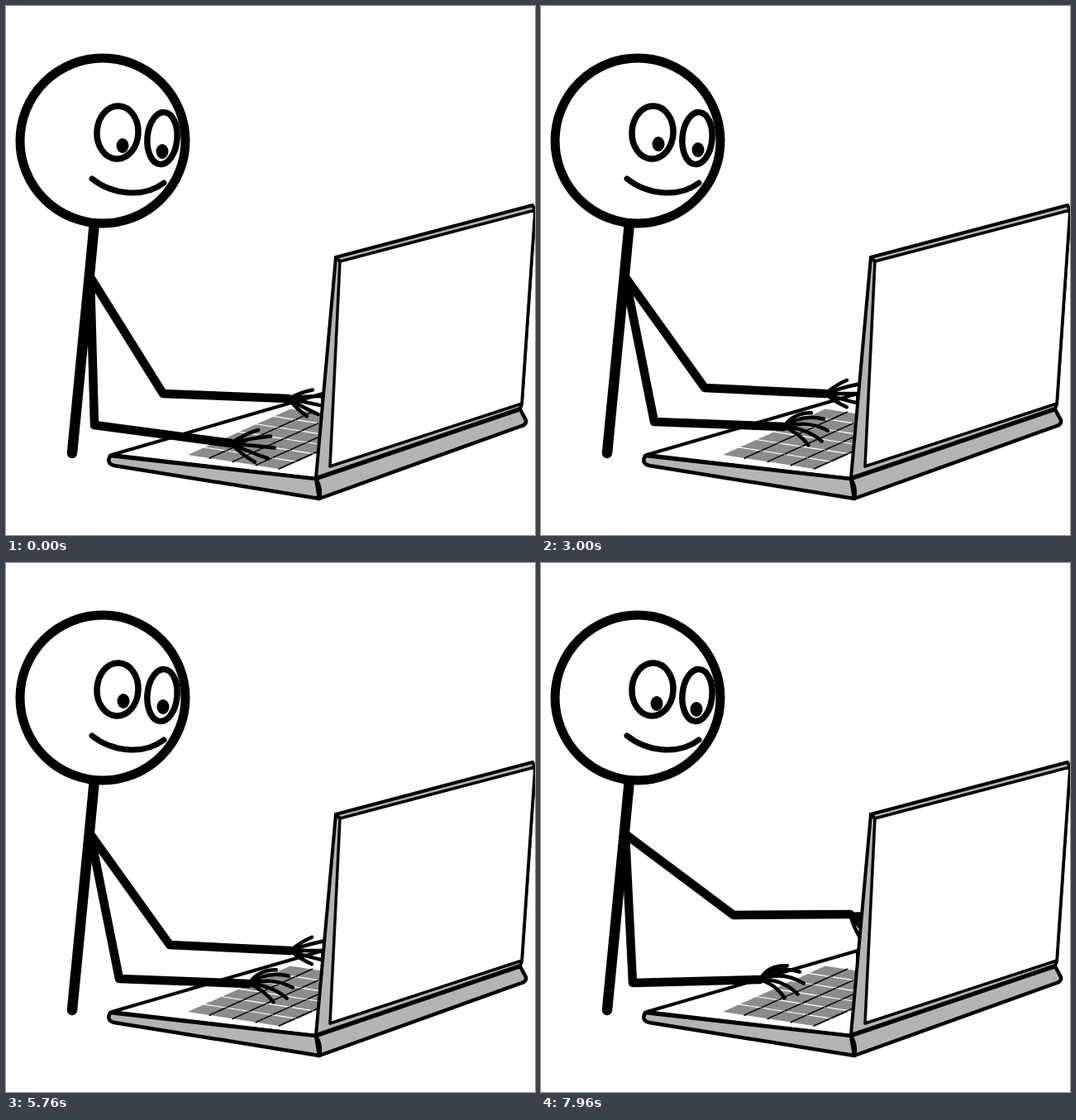
An HTML page that plays this animation: 640 px wide and 640 px high, repeating every 8 s.

```html
<!DOCTYPE html>
<html lang="en">
<head>
<meta charset="utf-8">
<title>Typing</title>
<style>
html, body { margin: 0; width: 100%; height: 100%; overflow: hidden; background: #fff; }
svg { display: block; width: 100%; height: 100%; }
</style>
</head>
<body>
<svg viewBox="0 0 640 640" fill="none" stroke="#000" stroke-linecap="round" stroke-linejoin="round">
  <g id="figure">
    <circle cx="117" cy="163" r="100" stroke-width="11"/>
    <ellipse cx="135" cy="153" rx="25" ry="32" stroke-width="7.5" transform="rotate(3 135 153)"/>
    <ellipse cx="189" cy="160" rx="18" ry="31.5" stroke-width="7.5" transform="rotate(5 189 160)"/>
    <path d="M104 209C128 228 166 233 191 214" stroke-width="7"/>
    <path d="M106.500 267L101 325L80 541" stroke-width="12.5"/>
    <g id="pupils" fill="#000" stroke="none">
      <ellipse cx="141" cy="169" rx="7.5" ry="9"/>
      <ellipse cx="189" cy="176" rx="7.5" ry="9"/>
    </g>
  </g>
  <g id="base" stroke-width="4.5">
    <path d="M128 543L383 469V535L375 572Z" fill="#fff" stroke-width="4"/>
    <g id="keys" fill="#8c8c8c" stroke="none"></g>
    <path d="M126 544Q121 554 131 556L379 596L375 572Z" fill="#b4b4b4"/>
    <path d="M375 572L622 488L629 501Q630 506 624 508L379 596Q382 584 375 572Z" fill="#b4b4b4"/>
  </g>
  <g id="far"><path stroke-width="10.5"/><path stroke-width="4.5"/></g>
  <g id="near"><path stroke-width="10.5"/><path stroke-width="4.5"/></g>
  <g id="screen" stroke-width="4">
    <path d="M399 304L637 241L640 247L624 482L622 487L375 571Z" fill="#b4b4b4"/>
    <path d="M404 309L640 247L624 481L392 557Z" fill="#fff" stroke-width="3.5"/>
    <path d="M399 304L404 309"/>
  </g>
</svg>
<script>
const $ = id => document.getElementById(id);
const LOOP = 8000, CYCLE = 920, DESK = 529;

// look: pupil shift; arms: elbow, wrist, hand tilt in degrees
const poses = [
  { at: 0,   look: [0, 0],  far: [190, 469, 342, 475, 12], near: [107, 507, 272, 529, 6] },
  { at: 240, look: [1, -2], far: [198, 462, 344, 469, 0],  near: [137, 503, 294, 509, 5] },
  { at: 360, look: [4, 0],  far: [211, 453, 348, 469, 0],  near: [118, 508, 275, 511, 5] },
  { at: 600, look: [-1, 1], far: [233, 426, 374, 425, 35], near: [111, 508, 265, 504, 5] }
];

const pose = i => poses[(i + poses.length) % poses.length];
const span = i => (pose(i + 1).at - pose(i).at + CYCLE) % CYCLE;

// cyclic cubic curve through the poses, without overshoot
function sample(part, t) {
  const i = poses.filter(p => p.at <= t).length - 1;
  const h = span(i), u = (t - pose(i).at) / h;
  const ease = u * u * (3 - 2 * u);
  return pose(0)[part].map((_, n) => {
    const val = k => pose(k)[part][n];
    const rate = k => (val(k + 1) - val(k)) / span(k);
    const tangent = k => {
      const a = rate(k - 1), b = rate(k);
      return a * b <= 0 ? 0 : 2 * a * b / (a + b);
    };
    return val(i) + (val(i + 1) - val(i)) * ease
      + h * u * (1 - u) * (tangent(i) * (1 - u) - tangent(i + 1) * u);
  });
}

function polar(x, y, deg, r) {
  const a = deg * Math.PI / 180;
  return `${x + r * Math.cos(a)} ${y + r * Math.sin(a)}`;
}

// five fingers fan out from the wrist, the middle one longest
function drawArm(id, [ex, ey, wx, wy, tilt], reach, curl) {
  const [arm, hand] = $(id).children;
  arm.setAttribute('d', `M102 328L${ex} ${ey}L${wx} ${wy}`);
  let d = '';
  for (let i = -2; i <= 2; i++) {
    const angle = tilt + 16 * i;
    const len = reach * Math.cos(0.4 * i);
    const bend = polar(wx, wy, angle + 4 * i - curl, len * 0.55);
    d += `M${wx} ${wy}Q${bend} ${polar(wx, wy, angle, len)}`;
  }
  hand.setAttribute('d', d);
}

function buildKeys() {
  let out = '';
  for (let row = 0; row < 6; row++) {
    for (let col = 0; col < 4; col++) {
      const x = 220 + row * 21 + col * 28;
      const y = 543 - row * 9.4 + col * 4.3;
      if (x > 372) continue;
      out += `<path d="M${x} ${y}l19 -8.5l26 4l-19 8.5Z"/>`
        + `<path d="M${x + 26.5} ${y + 4}l19 -8.5" stroke="#111" stroke-width="2"/>`;
    }
  }
  $('keys').innerHTML = out;
}

function render(ms) {
  const t = ms % LOOP % CYCLE;
  const near = sample('near', t);
  $('pupils').setAttribute('transform', `translate(${sample('look', t)})`);
  drawArm('far', sample('far', t), 44, 0);
  drawArm('near', near, 53, (DESK - near[3]) * 1.1); // a raised hand curls more
}

buildKeys();
const start = performance.now();
function tick() {
  render(performance.now() - start);
  requestAnimationFrame(tick);
}
tick();
</script>
</body>
</html>
```
